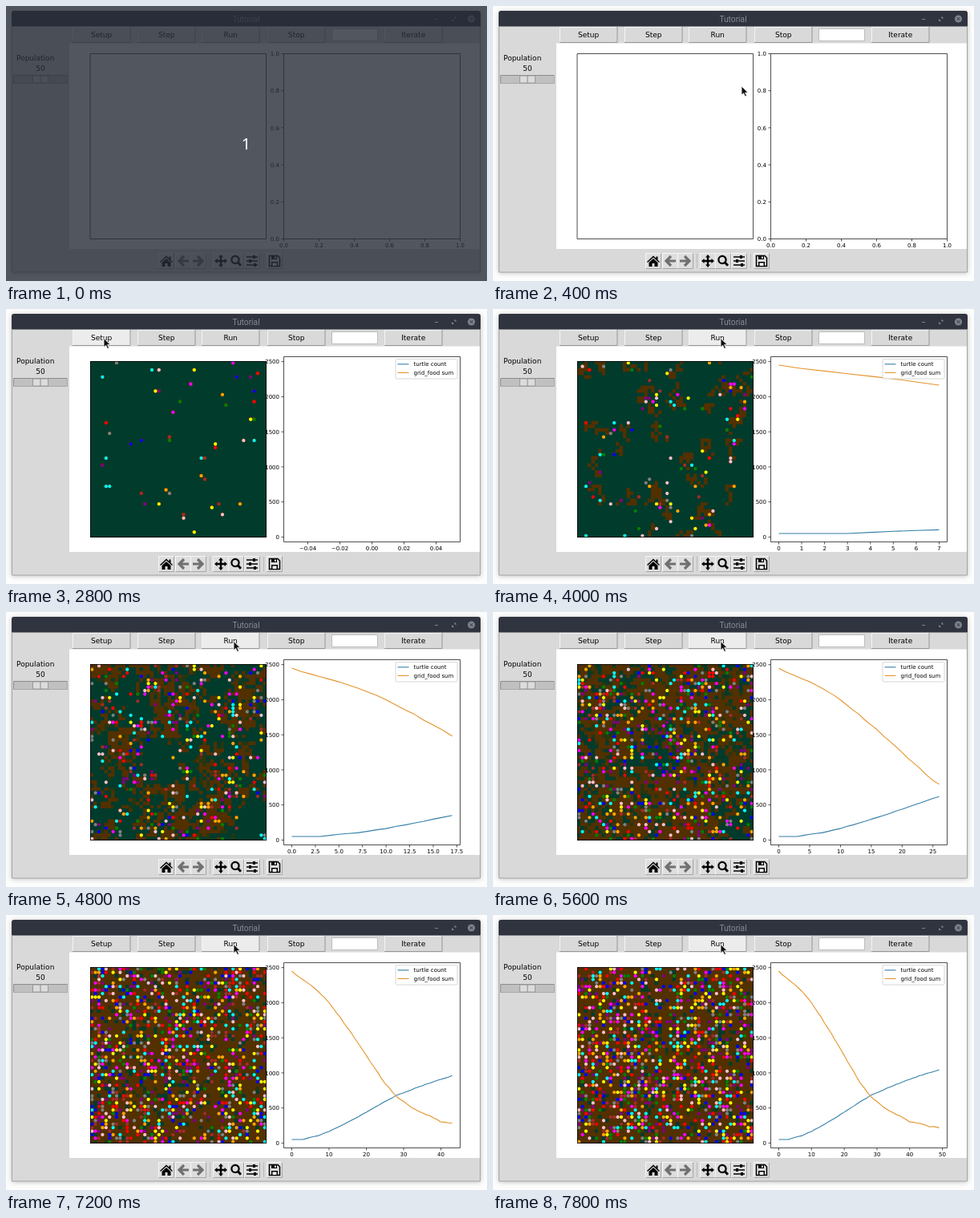
An HTML page with a canvas that plays this animation: 600x343 px, repeating every 8000 ms.

```html
<!DOCTYPE html>
<html lang="en">
<head>
<meta charset="utf-8">
<title>Tutorial</title>
<style>
  html, body { margin: 0; width: 100%; height: 100%; overflow: hidden; background: #fdfdfd; }
  #stage { position: relative; width: 600px; height: 343px; overflow: hidden; }
  #stage > * { position: absolute; left: 0; top: 0; }
  #window { left: 7px; top: 6px; width: 585px; height: 326px; border-radius: 3px 3px 0 0;
    background: #d9d9d9; box-shadow: 0 1px 6px rgba(0, 0, 0, .25); }
  #grid { left: 105px; top: 65px; width: 220px; height: 220px; }
  text { font-family: "DejaVu Sans", sans-serif; font-size: 9px; fill: #000; }
  .small text { font-size: 7px; }
  .mid { text-anchor: middle; }
  .end { text-anchor: end; }
  .axis { fill: none; stroke: #222; stroke-width: .8; }
  .curve { fill: none; stroke-width: 1.1; stroke-linejoin: round; }
  #title { font: 10.2px Roboto, sans-serif; fill: #858b97; }
  #count { font: 20px "Noto Sans", sans-serif; fill: #fff; }
</style>
</head>
<body>
<div id="stage">
  <div id="window"></div>
  <svg id="chrome" width="600" height="343">
    <path d="M7 25.500V9q0-3 3-3H589q3 0 3 3V25.500Z" fill="#2f343f"/>
    <text id="title" class="mid" x="299.500" y="19.500">Tutorial</text>
    <g stroke="#7c818c" fill="none">
      <path d="M535 16.500h4M556.500 18.500l1.500-1.500M559.500 15.500l1.500-1.500M556.500 16.500v2h2M559 14h2v2"/>
      <circle cx="580.500" cy="16" r="4.600" fill="#7c818c" stroke="none"/>
      <path d="M578.700 14.200l3.600 3.600m0-3.600l-3.600 3.600" stroke="#2f343f"/>
    </g>
    <path d="M79 46.500H592V303H79Z" fill="#fff"/>
    <path d="M7.500 25.500V332H591.500V25.500" fill="none" stroke="#a4a4a4"/>
    <g id="buttons"></g>
    <path d="M406.500 28.500h57v15h-57z" fill="#fff" stroke="#bdbdbd"/>
    <text class="mid" x="36.700" y="68">Population</text>
    <text class="mid" x="43" y="81.300">50</text>
    <path d="M9 86h68v11h-68z" fill="#c0c0c0"/>
    <path d="M9.500 97V86.500H77" fill="none" stroke="#8c8c8c"/>
    <path d="M9 96.500H76.500V86" fill="none" stroke="#a8a8a8"/>
    <path d="M33.500 87h19v9h-19z" fill="#dcdcdc" stroke="#999"/>
    <path d="M43 87v9" stroke="#8c8c8c"/>
    <g id="tools"></g>
    <path d="M254.500 309v18M321.500 309v18" stroke="#bbb"/>
  </svg>
  <canvas id="grid" width="440" height="440"></canvas>
  <svg id="front" width="600" height="343">
    <g id="plot" class="small"></g>
    <path id="arrow" d="M0 0V11.200L2.600 8.800 4.600 13 6.500 12.100 4.600 8.100H8.200Z" fill="#111" stroke="#fff" stroke-width=".8"/>
    <g id="busy" transform="translate(125 40.500)">
      <circle r="5" fill="#fff" stroke="#111" stroke-width="1.800"/>
      <circle cx=".6" cy=".8" r="2.700" fill="#111"/>
      <circle cx="-1" cy="-1" r="1.100" fill="#fff"/>
    </g>
    <g id="veil">
      <path d="M0 0H600V343H0Z" fill="rgb(39,44,55)" fill-opacity=".8"/>
      <text id="count" class="mid" x="299.500" y="179">1</text>
    </g>
  </svg>
</div>
<script>
const LOOP = 8000, FRAME = 200, SIZE = 50, LAST = 49;
const BLUE = '#367fa8', ORANGE = '#e4942b';
const $ = id => document.getElementById(id);
const show = (id, on) => $(id).style.display = on ? '' : 'none';

function random(seed) {
  return () => {
    seed = seed + 0x6D2B79F5 | 0;
    let h = Math.imul(seed ^ seed >>> 15, 1 | seed);
    h = h + Math.imul(h ^ h >>> 7, 61 | h) ^ h;
    return ((h ^ h >>> 14) >>> 0) / 4294967296;
  };
}

// Linear interpolation over rows of [x, value, ...]
function at(rows, x, col = 1) {
  if (x <= rows[0][0]) return rows[0][col];
  for (let i = 1; i < rows.length; i++) {
    const a = rows[i - 1], b = rows[i];
    if (x <= b[0]) return a[col] + (b[col] - a[col]) * (x - a[0]) / (b[0] - a[0]);
  }
  return rows[rows.length - 1][col];
}

const turtleCurve = [[0, 50], [3, 50], [5, 82], [7, 103], [10, 165], [15, 295], [20, 440],
  [26, 620], [28, 675], [34, 800], [43, 960], [49, 1043]];
const foodCurve = [[0, 2450], [1, 2402], [5, 2255], [7, 2165], [10, 2005], [15, 1640], [20, 1245],
  [25, 850], [26, 790], [28, 670], [31, 550], [34, 447], [37, 385], [40, 303], [43, 285], [46, 235], [49, 222]];
const tickTimes = [[3400, 0], [4000, 7], [5600, 26], [7800, 49]];
const cursorPath = [[400, 310, 100], [1200, 122, 36.5], [3000, 122, 36.5], [3400, 284, 36.5]];

// Start spots in stage pixels
const spots = [[130, 75], [180, 80], [225, 85], [270, 115], [215, 120], [190, 110], [280, 75], [310, 85],
  [300, 110], [125, 150], [165, 160], [215, 155], [260, 170], [240, 185], [300, 175], [305, 145],
  [130, 195], [130, 215], [200, 235], [245, 215], [180, 245], [215, 255], [265, 250], [300, 235],
  [275, 265], [235, 270], [160, 220]];
const colours = ['red', 'blue', 'yellow', 'magenta', 'cyan', 'orange', 'pink', 'gray', 'green', 'purple', 'brown'];

// Turtles graze, breed where they are fed and starve elsewhere; grass slowly regrows
function simulate() {
  const rnd = random(11), cells = SIZE * SIZE, ticks = [];
  const food = new Uint8Array(cells).fill(1), visited = new Int16Array(cells);
  const sparse = Array.from(food, () => rnd() < .3);
  const crowd = new Uint8Array(cells);
  const wrap = v => (v + SIZE) % SIZE;
  const cell = p => p.y * SIZE + p.x;
  const one = list => list[Math.floor(rnd() * list.length)];
  const near = (t, r) => {
    const step = () => Math.floor(rnd() * (2 * r + 1)) - r;
    return { x: wrap(t.x + step()), y: wrap(t.y + step()) };
  };
  const worth = p => food[cell(p)] - 2 * crowd[cell(p)];
  const best = (t, r) => {
    let p = near(t, r);
    for (let k = 0; k < 3; k++) {
      const q = near(t, r);
      if (worth(q) > worth(p)) p = q;
    }
    return p;
  };
  let left = cells, turtles = [];

  const settle = (t, p) => {
    crowd[cell(p)]++;
    return Object.assign(t, p);
  };
  for (let i = 0; i < 50; i++) {
    const [px, py] = spots[i % spots.length];
    const home = { x: Math.floor((px - 105) / 4.4), y: Math.floor((py - 65) / 4.4) };
    turtles.push(settle({ c: one(colours) }, best(home, 2)));
  }

  for (let n = 0; n <= LAST; n++) {
    const goal = at(foodCurve, n), fed = [];
    const eat = p => {
      if (!food[cell(p)] || left <= goal) return false;
      food[cell(p)] = 0;
      left--;
      return true;
    };
    if (n > 10) {
      food.forEach((f, i) => {
        if (!f && rnd() < .03) { food[i] = 1; left++; }
      });
    }
    for (const t of turtles) {
      if (n) {
        const p = best(t, 1);
        crowd[cell(t)]--;
        settle(t, p);
      }
      visited[cell(t)] = n;
      if (eat(t)) fed.push(t);
    }
    if (n > 8) {
      turtles = turtles.filter(t => {
        const stay = fed.includes(t) || rnd() > .12;
        if (!stay) crowd[cell(t)]--;
        return stay;
      });
    }
    while (turtles.length < Math.round(at(turtleCurve, n))) {
      const parent = one(fed.length ? fed : turtles);
      turtles.push(settle({ c: one(colours) }, best(parent, n < 8 ? 1 : 2)));
    }
    for (let k = 0; k < 9000 && left > goal; k++) eat(near(one(turtles), n < 8 ? 1 : 3));
    ticks.push({
      cells: food.map((f, i) => f ? 0 : n - visited[i] > 6 && n > 8 && sparse[i] ? 2 : 1),
      turtles: turtles.map(t => ({ ...t }))
    });
  }
  return ticks;
}

const ticks = simulate();
const noise = random(5);
const series = Array.from({ length: LAST + 1 }, (_, n) => {
  const j = n > 8 ? 12 : 0;
  return [at(turtleCurve, n) + (noise() - .5) * j * .6, at(foodCurve, n) + (noise() - .5) * j];
});

const ctx = $('grid').getContext('2d');
function drawGrid(n) {
  const u = 440 / SIZE, { cells, turtles } = ticks[n];
  cells.forEach((c, i) => {
    ctx.fillStyle = ['#003b2c', '#523000', '#263611'][c];
    const x = i % SIZE * u, y = Math.floor(i / SIZE) * u;
    ctx.fillRect(Math.floor(x), Math.floor(y), 9, 9);
  });
  for (const t of turtles) {
    ctx.fillStyle = t.c;
    ctx.beginPath();
    ctx.arc((t.x + .5) * u, (t.y + .5) * u, 4.2, 0, 7);
    ctx.fill();
  }
  ctx.strokeStyle = '#000';
  ctx.lineWidth = 1.6;
  ctx.strokeRect(.8, .8, 438.4, 438.4);
}

const label = (x, y, s, cls) => `<text class="${cls}" x="${x}" y="${y}">${s}</text>`;
const xTick = (x, s) => `<path class="axis" d="M${x} 290.500v3"/>` + label(x, 301.3, s, 'mid');
const yTick = (y, s) => `<path class="axis" d="M346.500 ${y}h-3"/>` + label(341, y + 2.6, s, 'end');
const frame = '<path class="axis" d="M346.500 59.500h220v231h-220z"/>';

function emptyPlot() {
  let s = frame + '<path class="axis" d="M105 59.500h219.500v231H105z"/>';
  for (let i = 0; i <= 5; i++) {
    const v = (i / 5).toFixed(1);
    s += xTick(346.5 + i * 44, v) + yTick(290.5 - i * 46.2, v);
  }
  return s;
}

function drawPlot(n) {
  const span = n || .1, X = v => n ? 356.5 + v / span * 200 : 456.5 + v * 2000;
  const Y = v => 284.4 - v * .0875;
  const raw = span * 1.1 / 9, mag = 10 ** Math.floor(Math.log10(raw));
  const step = [1, 2, 2.5, 5, 10].map(m => m * mag).find(m => m >= raw - 1e-9);
  const digits = step < .1 ? 2 : step < 1 || step % 1 ? 1 : 0;
  const reach = n ? n * 1.05 : .055;
  let s = frame;
  for (let k = n ? 0 : -Math.floor(reach / step); k * step <= reach; k++) {
    s += xTick(X(k * step), (k * step).toFixed(digits).replace('-', '\u2212'));
  }
  for (let v = 0; v <= 2500; v += 500) s += yTick(Y(v), v);
  [BLUE, ORANGE].forEach((c, i) => {
    const pts = series.slice(0, n + 1).map((p, k) => `${X(k).toFixed(1)},${Y(p[i]).toFixed(1)}`);
    s += `<polyline class="curve" stroke="${c}" points="${pts.join(' ')}"/>`;
  });
  s += '<rect x="486" y="62.500" width="77" height="24.500" rx="1.500" fill="#fff" fill-opacity=".8" stroke="#ccc" stroke-width=".8"/>';
  [[BLUE, 'turtle count'], [ORANGE, 'grid_food sum']].forEach(([c, name], i) => {
    const y = 68.8 + i * 10.6;
    s += `<path class="curve" stroke="${c}" d="M488.500 ${y}h14"/>` + label(508.5, y + 2.4, name, '');
  });
  return s;
}

const buttons = [['Setup', 83], ['Step', 164], ['Run', 244], ['Stop', 326], ['Iterate', 472]];
$('buttons').innerHTML = buttons.map(([name, x]) =>
  `<rect x="${x}" y="26" width="72.500" height="20" fill="#d9d9d9"/>
   <path d="M${x + .5} 45V26.500h71" fill="none" stroke="#f4f4f4"/>
   <path d="M${x} 45.500h72V26" fill="none" stroke="#969696"/>` + label(x + 36.2, 39, name, 'mid')).join('');
const faces = [...$('buttons').querySelectorAll('rect')];

const back = '<path d="M7 0H-5M1-6L-5 0 1 6" fill="none" stroke="#707070" stroke-width="3.200"/>';
const cross = '<path d="M0-8L3-4.500H1.200V-1.200H4.500V-3L8 0 4.500 3V1.200H1.200V4.500H3L0 8-3 4.500H-1.200V1.200H-4.500V3L-8 0-4.500-3V-1.200H-1.200V-4.500H-3Z"/>';
const tools = [
  [200, '<path d="M-8 1L0-6.500 3.500-3.200V-5.500H5.500V-1.300L8 1 7 2 0-4.500-7 2ZM-5.500 2L0-3 5.500 2V7H1.500V3H-1.500V7H-5.500Z"/>'],
  [221, back],
  [240, `<g transform="scale(-1 1)">${back}</g>`],
  [268, cross],
  [287, '<circle cx="-1" cy="-1.500" r="4.600" fill="none" stroke="#000" stroke-width="2.200"/><path d="M2.500 2L6 5.800" stroke="#000" stroke-width="3"/>'],
  [307, '<path d="M-7-5H7M-7 0H7M-7 5H7" stroke="#000" stroke-width="1.700"/><path d="M1-7h3v4H1zM-4-2h3v4h-3zM2 3h3v4H2z"/>'],
  [335, '<path d="M-6.500-6.500H4L6.500-4V6.500H-6.500Z" fill="none" stroke="#000" stroke-width="1.500"/><path d="M-4-6.500H3V-2H-4ZM-4 1H4V6.500H-4Z"/><path d="M0-5.500h1.700v2.500H0zM-2.500 2.500h5v3.500h-5z" fill="#fff"/>']
];
$('tools').innerHTML = tools.map(([x, art]) =>
  `<g transform="translate(${x} 318)"><path d="M-9.500-9.500h19v19h-19z" fill="#dedede"/>
   <path d="M-9.500 9.500v-19h19" fill="none" stroke="#f6f6f6"/>
   <path d="M-9.500 9.500h19v-19" fill="none" stroke="#a6a6a6"/>${art}</g>`).join('');

let shown = -1, state;
function render(t) {
  show('veil', t < 400);
  const x = at(cursorPath, t), y = at(cursorPath, t, 2);
  const busy = t >= 1600 && t < 2000;
  show('busy', busy);
  show('arrow', t >= 400 && !busy);
  $('arrow').setAttribute('transform', `translate(${x} ${y})`);
  faces.forEach((f, i) => {
    const over = t >= 400 && y < 46 && x >= buttons[i][1] && x < buttons[i][1] + 73;
    f.setAttribute('fill', over ? '#ececec' : '#d9d9d9');
  });

  const n = t < 2000 ? null : Math.round(at(tickTimes, t));
  if (n === state) return;
  state = n;
  show('grid', n !== null);
  $('plot').innerHTML = n === null ? emptyPlot() : drawPlot(n);
  if (n !== null) drawGrid(n);
}

const start = performance.now();
function loop() {
  const t = Math.floor((performance.now() - start) % LOOP / FRAME) * FRAME;
  if (t !== shown) render(shown = t);
  requestAnimationFrame(loop);
}
loop();
</script>
</body>
</html>
```
